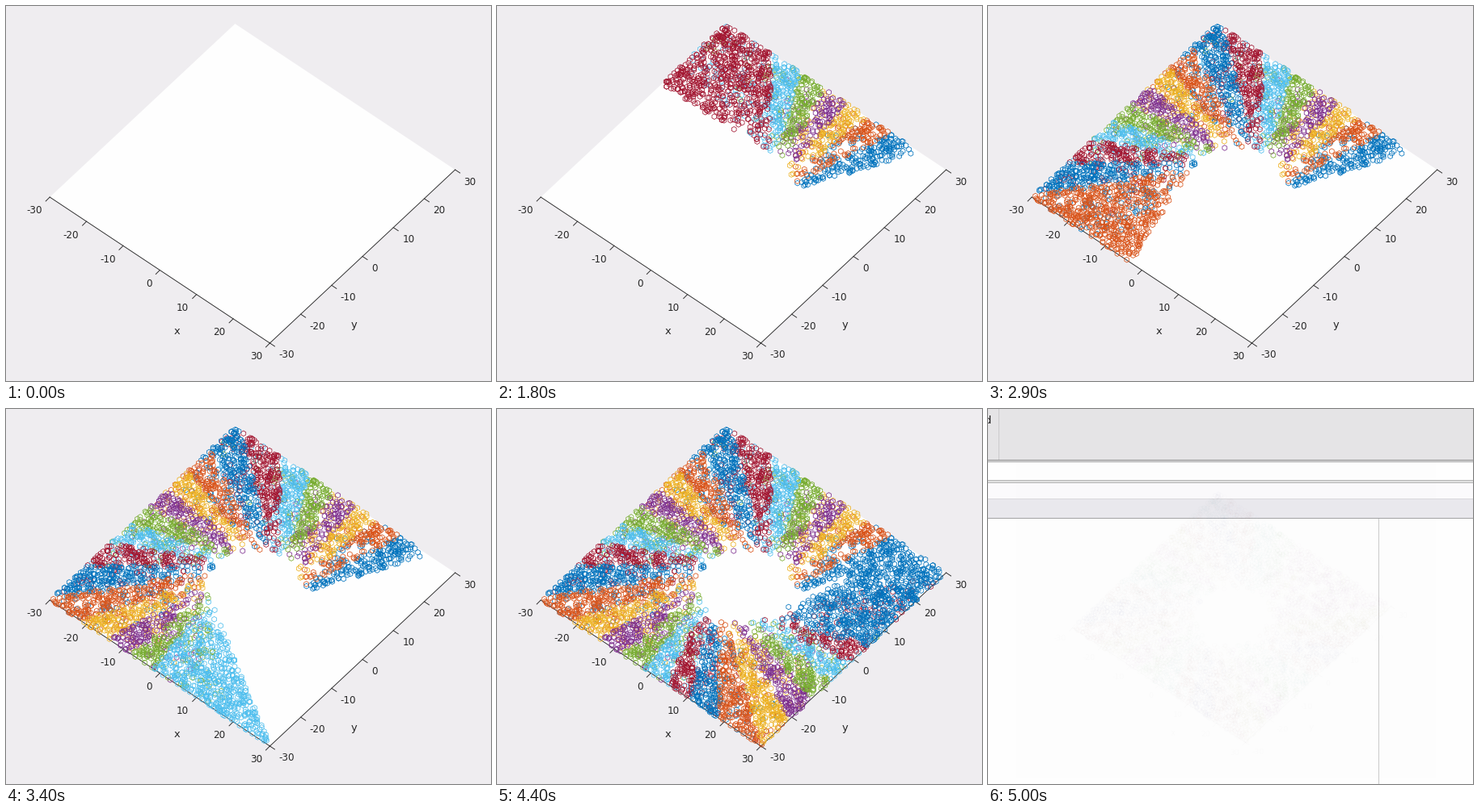
These frames come from a looping animation (600x465 px, 6500 ms). A matplotlib script:

```python
import numpy as np
import matplotlib.pyplot as plt
from matplotlib.animation import FuncAnimation
from matplotlib.patches import Polygon, Rectangle

W, H, DPI = 600, 465, 60
PX = 72 / DPI                      # points per pixel
INK, PANEL, WHITE = "#262626", "#efedf0", "#fefefe"
COLORS = np.array(["#0072BD", "#D95319", "#EDB120", "#7E2F8E",
                   "#77AC30", "#4DBEEE", "#A2142F"])
SCANS = 32
START, STEP, HEADING, HALF_VIEW = np.radians([25, 11.35, 62, 25.3])
ORBIT = 9.4                        # radius of the sensor's path
MARKER = (6.7 * PX) ** 2
PIVOT = np.array([289, 396])       # fixed point of the closing window

# number of finished scans at some frame numbers
SCAN_FRAMES = [7, 8, 9, 14, 18, 21, 25, 28, 34, 35, 42, 43, 44, 47]
SCAN_COUNTS = [0, 1, 1, 4, 7, 10, 13, 15, 20, 21, 26, 28, 29, 32]


def project(x, y):
    """Ground position to stage pixels."""
    return np.stack([304.9 + 4.5375 * x + 3.82 * y,
                     220 + 3.017 * x - 3.583 * y], axis=-1)


def make_landmarks(rng):
    x, y = rng.uniform(-30, 30, (2, 7600))
    r = np.hypot(x, y)
    keep = (r > 9.6) & (rng.random(x.size) < np.clip((r - 6) / 12, 0.35, 1))
    x, y = x[keep], y[keep]
    gap = (project(x, y) - [431, 174]) / [7, 10]
    open_ground = np.hypot(gap[:, 0], gap[:, 1]) > 1
    return x[open_ground], y[open_ground]


def scan_all(x, y, rng):
    """Which landmarks each scan sees while the sensor circles the centre."""
    seen = np.zeros((SCANS, x.size), bool)
    chance = np.clip(0.38 + np.hypot(x, y) / 65, 0.5, 0.85)
    for k in range(SCANS):
        theta = START + STEP * k
        sight = np.arctan2(y - ORBIT * np.sin(theta),
                           x - ORBIT * np.cos(theta))
        off = np.angle(np.exp(1j * (sight - theta - HEADING)))
        seen[k] = (np.abs(off) < HALF_VIEW) & (rng.random(x.size) < chance)
    return seen


rng = np.random.default_rng(4)
land_x, land_y = make_landmarks(rng)
land_px = project(land_x, land_y)
seen = scan_all(land_x, land_y, rng)

fig = plt.figure(figsize=(W / DPI, H / DPI), dpi=DPI, facecolor=WHITE)


def add_stage(z):
    ax = fig.add_axes([0, 0, 1, 1], zorder=z)
    ax.set(xlim=(0, W), ylim=(H, 0))
    ax.axis("off")
    return ax


desk, scene = add_stage(1), add_stage(2)


def draw_desktop():
    def bar(x, y, w, h, color):
        desk.add_patch(Rectangle((x, y), w, h, fc=color, lw=0,
                                 antialiased=False))

    bar(0, 0, W, H, WHITE)
    bar(0, 0, W, 63, "#e5e4e6")
    bar(13, 0, 1, 63, "#cbcacc")
    bar(0, 63, W, 1, "#858585")
    bar(0, 64, W, 1, "#efeff0")
    bar(0, 65, W, 1, "#a0a0a0")
    bar(0, 88, W, 1, "#b4b4b4")
    bar(0, 89, W, 2, "#e0e0e0")
    bar(0, 91, W, 1, "#b8b8b8")
    bar(0, 92, W, 19, "#fbfafc")
    bar(0, 111, W, 1, "#d9d8dc")
    bar(0, 112, W, 23, "#e9e8ed")
    bar(0, 135, W, 1, "#a2a2a4")
    bar(483, 136, 1, H - 136, "#cacaca")
    desk.text(4, 18, "d", ha="right", va="baseline", fontsize=13 * PX,
              color="#1c1c1c", family="DejaVu Sans")


def draw_plane():
    """Window, ground plane and its two axes; returns artists and labels."""
    corners = project(np.array([-30, 30, 30, -30]), np.array([-30, -30, 30, 30]))
    parts = [scene.add_patch(Rectangle((-35, -100), 661, 574, fc=PANEL, lw=0)),
             scene.add_patch(Polygon(corners, fc=WHITE, lw=0))]
    labels = []

    def line(a, b):
        parts.extend(scene.plot([a[0], b[0]], [a[1], b[1]], color=INK,
                                lw=0.9 * PX, zorder=2))

    def label(x, y, text, ha, size):
        labels.append((scene.text(x, y, text, ha=ha, va="baseline",
                                  color=INK, fontsize=size * PX,
                                  family="DejaVu Sans"), size * PX))

    line(corners[0], corners[1])
    line(corners[1], corners[2])
    for v in range(-30, 31, 10):
        p = project(v, -30)
        line(p, p + [-5, 5])
        label(p[0] - 9.5, p[1] + 20.5, str(v), "right", 12)
        p = project(30, v)
        line(p, p + [6, 4])
        label(p[0] + 11, p[1] + 18.5, str(v), "left", 12)
    label(212, 407, "x", "center", 13)
    label(430, 399, "y", "center", 13)
    return parts, labels


draw_desktop()
parts, labels = draw_plane()
points = scene.scatter([], [], s=MARKER, marker=(6, 0, 0), facecolors="none",
                       linewidths=0.75 * PX, zorder=3)
cursor = scene.add_patch(Polygon(
    [(566, 453), (566, 473), (571, 469), (575, 476), (578, 474), (574, 466),
     (579, 466)], fc="#1a1a1a", ec="white", lw=0.8 * PX, zorder=5))


def show_scans(count):
    if count == 0:
        points.set_offsets(np.empty((0, 2)))
        return
    last = np.where(seen[:count], np.arange(count)[:, None], -1).max(axis=0)
    order = np.argsort(last, kind="stable")
    order = order[last[order] >= 0]
    points.set_offsets(land_px[order])
    points.set_edgecolors(COLORS[last[order] % len(COLORS)])


def set_window(scale, alpha):
    low = PIVOT - PIVOT / scale
    high = PIVOT + (np.array([W, H]) - PIVOT) / scale
    scene.set_xlim(low[0], high[0])
    scene.set_ylim(high[1], low[1])
    points.set_sizes([MARKER * scale ** 2])
    for text, size in labels:
        text.set_fontsize(size * scale)
        text.set_alpha(alpha)
    for part in parts + [points]:
        part.set_alpha(alpha)


def update(i):
    show_scans(int(np.interp(i, SCAN_FRAMES, SCAN_COUNTS) + 0.5))
    cursor.set_visible(7 <= i <= 10)
    if i < 49:
        set_window(1, 1)
    elif i == 49:
        set_window(0.9, 0.45)
    else:
        set_window(0.785, 0.012)
    return []


anim = FuncAnimation(fig, update, frames=65, interval=100, repeat=True,
                     repeat_delay=0, init_func=lambda: update(0))
plt.show()
```
